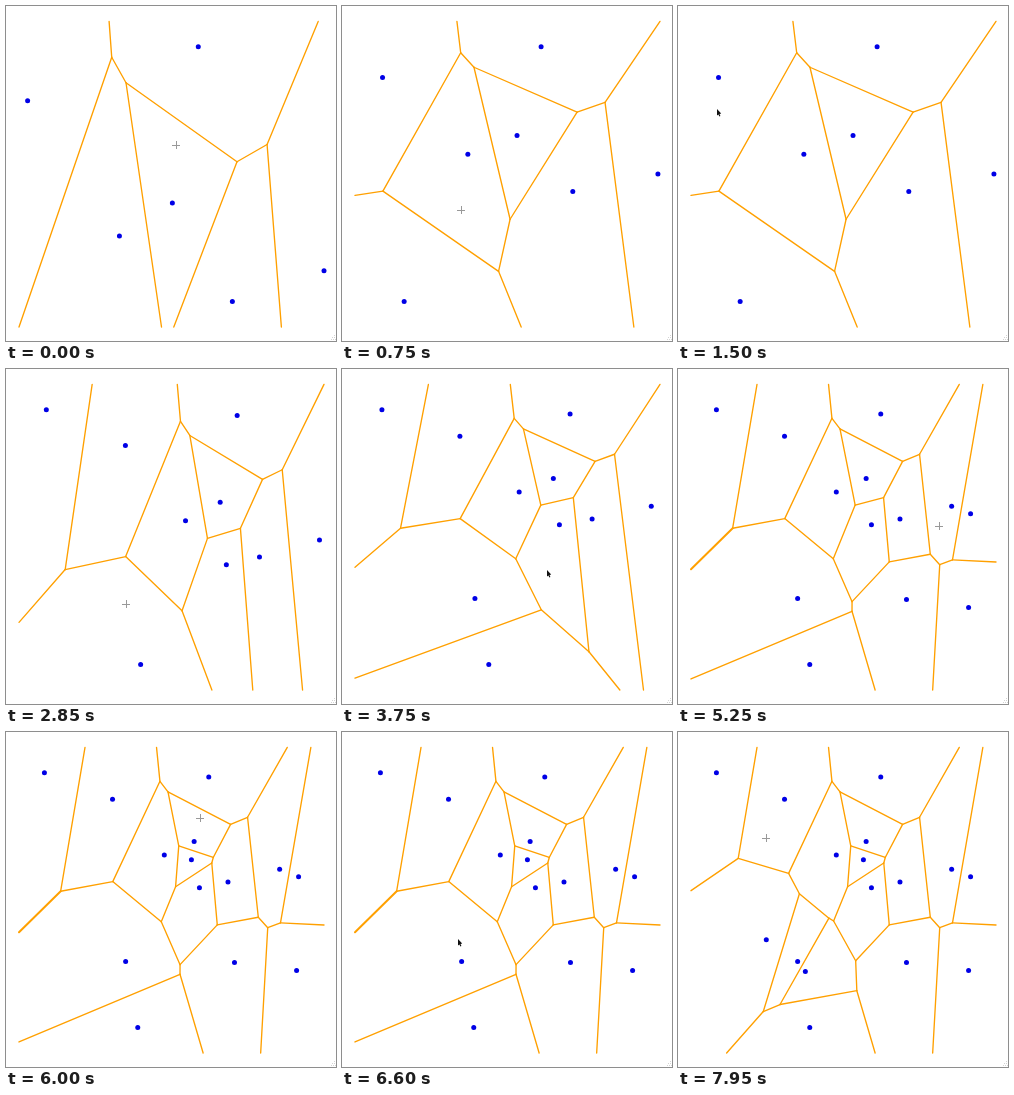
Animation, 330 px wide and 335 px high, one loop 8 s. Source, as an HTML page with a canvas:

```html
<!DOCTYPE html>
<html lang="en">
<head>
<meta charset="utf-8">
<title>Growing Voronoi diagram</title>
<style>
html, body { margin: 0; width: 100%; height: 100%; overflow: hidden; background: #fff; }
canvas { display: block; width: 330px; height: 335px; }
</style>
</head>
<body>
<canvas id="stage" width="330" height="335"></canvas>
<script>
const ctx = document.getElementById('stage').getContext('2d');
const LOOP = 8000, STEP = 150;
const BOX = { x0: 13, x1: 318, y0: 15.4, y1: 321 };
const ASPECT = Math.sqrt(0.435);

// Sites in the order they are added; the first six are there at the start.
const sites = [
  [106.2, 67.4], [202.3, 45.2], [187.7, 109.6], [157.9, 123.2], [221.5, 150.2], [273.1, 137.5],
  [119.3, 230], [38.2, 41], [193, 156], [131.4, 296], [228, 231],
  [290, 239], [292, 145], [185, 128], [127, 240], [88, 208]
].map(([x, y]) => [x, y * ASPECT]);
const START = 6;
const clicks = [750, 1650, 2250, 3000, 3900, 4500, 4950, 5700, 6750, 7350];

// Pointer path: time, x, y.
const path = [
  [150, 170, 139], [750, 119, 204], [900, 112, 196], [1050, 112, 196],
  [1500, 40, 106], [1650, 38, 78], [2250, 193, 155], [2850, 120, 235],
  [3000, 131, 248], [3150, 131, 248], [3750, 206, 204], [3900, 228, 205],
  [4500, 290, 210], [4950, 292, 147], [5250, 261, 157], [5700, 185, 136],
  [6300, 202, 35], [6600, 117, 210], [6750, 127, 211], [7350, 83, 190], [7950, 88, 106]
];
const arrowTimes = [1500, 3750, 6600];

const range = (list, axis) => {
  const v = list.map(p => p[axis]);
  return [Math.min(...v), Math.max(...v)];
};

// Keep the part of a cell nearer to a than to b; each corner names the edge that follows it.
function cut(cell, a, b, id) {
  const side = p =>
    (p[0] - (a[0] + b[0]) / 2) * (b[0] - a[0]) + (p[1] - (a[1] + b[1]) / 2) * (b[1] - a[1]);
  const out = [];
  cell.forEach((p, i) => {
    const q = cell[(i + 1) % cell.length];
    const sp = side(p), sq = side(q);
    if (sp <= 0) out.push(p);
    if ((sp <= 0) !== (sq <= 0)) {
      const f = sp / (sp - sq);
      out.push([p[0] + (q[0] - p[0]) * f, p[1] + (q[1] - p[1]) * f, sp <= 0 ? id : p[2]]);
    }
  });
  return out;
}

function diagram(count) {
  const pts = sites.slice(0, count);
  const [[l, r], [t, b]] = [0, 1].map(axis => {
    const [lo, hi] = range(pts, axis), pad = (hi - lo) / 10;
    return [lo - pad, hi + pad];
  });
  const edges = [];
  pts.forEach((a, i) => {
    let cell = [[l, t, -1], [r, t, -1], [r, b, -1], [l, b, -1]];
    pts.forEach((p, j) => { if (j !== i) cell = cut(cell, a, p, j); });
    cell.forEach((p, n) => {
      if (p[2] > i) edges.push([p, cell[(n + 1) % cell.length]]);
    });
  });
  // Fit everything that is drawn to the plot box.
  const all = pts.concat(...edges);
  const [xl, xh] = range(all, 0), [yl, yh] = range(all, 1);
  const fit = p => [
    BOX.x0 + (p[0] - xl) / (xh - xl) * (BOX.x1 - BOX.x0),
    BOX.y0 + (p[1] - yl) / (yh - yl) * (BOX.y1 - BOX.y0)
  ];
  return { dots: pts.map(fit), edges: edges.map(e => e.map(fit)) };
}

const views = Array.from({ length: clicks.length + 1 }, (_, i) => diagram(START + i));

function pointerAt(t) {
  const i = path.findIndex(k => k[0] >= t);
  if (i <= 0) return path[0].slice(1);
  const [t0, x0, y0] = path[i - 1], [t1, x1, y1] = path[i];
  const f = (t - t0) / (t1 - t0);
  return [Math.round(x0 + (x1 - x0) * f), Math.round(y0 + (y1 - y0) * f)];
}

function drawPlot({ dots, edges }) {
  ctx.strokeStyle = '#ffa000';
  ctx.lineCap = 'round';
  for (const [[x0, y0], [x1, y1]] of edges) {
    const slope = (y1 - y0) / (x1 - x0);
    ctx.lineWidth = Math.abs(slope + 1) < 0.03 ? 2 : 1.35;
    ctx.beginPath();
    ctx.moveTo(x0, y0);
    ctx.lineTo(x1, y1);
    ctx.stroke();
  }
  ctx.fillStyle = '#0000e6';
  for (const [x, y] of dots) {
    ctx.beginPath();
    ctx.arc(x, y, 2.5, 0, 7);
    ctx.fill();
  }
}

function drawCross(x, y) {
  ctx.fillStyle = '#999';
  ctx.fillRect(x - 4, y, 8, 1);
  ctx.fillRect(x, y - 4, 1, 8);
}

function drawArrow(x, y) {
  ctx.fillStyle = '#111';
  ctx.beginPath();
  [[-1, -3], [-1, 3.5], [0.4, 2.4], [1.4, 4.4], [2.4, 4], [1.5, 2], [3.2, 1.6]]
    .forEach(([dx, dy]) => ctx.lineTo(x + dx, y + dy));
  ctx.fill();
}

function drawGrip() {
  ctx.fillStyle = '#d4d4d4';
  for (const [x, y] of [[328, 329], [326, 331], [328, 331], [325, 333], [327, 333], [329, 333]]) {
    ctx.fillRect(x, y, 1, 1);
  }
}

function frame(now) {
  const t = Math.floor((now % LOOP) / STEP) * STEP;
  ctx.fillStyle = '#fff';
  ctx.fillRect(0, 0, 330, 335);
  drawPlot(views[clicks.filter(c => c <= t).length]);
  drawGrip();
  const arrow = arrowTimes.some(a => t === a || t === a - STEP);
  (arrow ? drawArrow : drawCross)(...pointerAt(t));
}

const begin = performance.now();
function tick() {
  frame(performance.now() - begin);
  requestAnimationFrame(tick);
}
tick();
</script>
</body>
</html>
```
